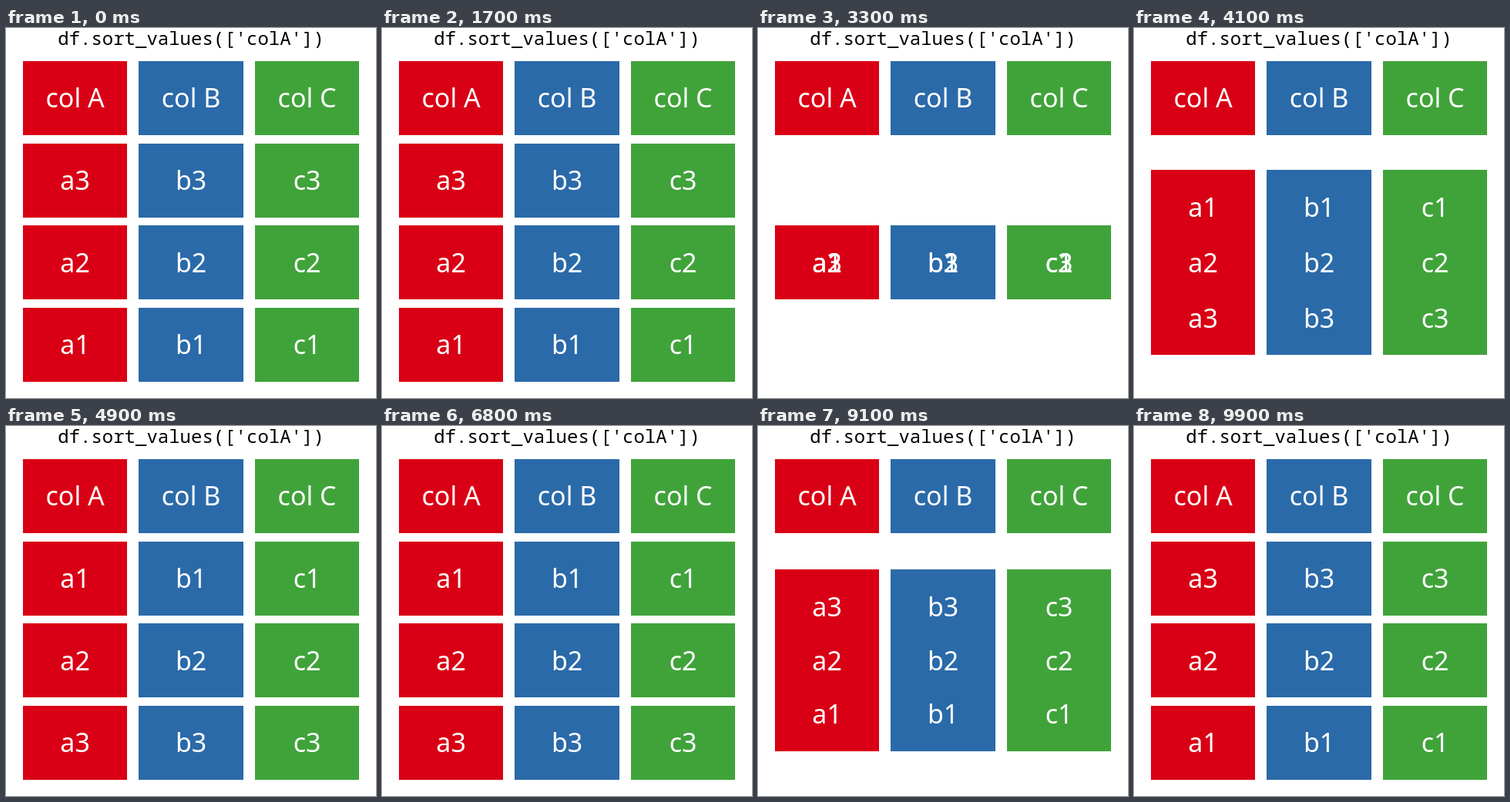
These frames come from a looping animation (480x480 px, 10000 ms). An HTML page with a canvas:

```html
<!DOCTYPE html>
<html lang="en">
<head>
<meta charset="utf-8">
<title>Sorting rows</title>
<style>
  html, body { margin: 0; height: 100%; overflow: hidden; background: #fff; }
  canvas { display: block; }
</style>
</head>
<body>
<canvas id="stage" width="480" height="480"></canvas>
<script>
const ctx = document.getElementById('stage').getContext('2d');
const LOOP = 10000, STEP = 100;
const MID = 256.35, PITCH = 106.8, HEIGHT = 96;
const columns = ['A', 'B', 'C'].map((name, i) => ({
  name,
  left: 21.8 + 150.5 * i,
  color: ['#d90015', '#2b6aa9', '#40a33a'][i]
}));

// Half a cosine wave from 1 to -1 between two times
function sweep(t, start, end) {
  const p = Math.min(1, Math.max(0, (t - start) / (end - start)));
  return Math.cos(Math.PI * p);
}

function box(col, top) {
  const x = Math.round(col.left), y = Math.round(top);
  ctx.fillStyle = col.color;
  ctx.fillRect(x, y, Math.round(col.left + 135.6) - x, Math.round(top + HEIGHT) - y);
}

function label(col, top, text) {
  ctx.fillStyle = '#fff';
  ctx.fillText(text, col.left + 67.8, top + 60.2);
}

function draw(now) {
  const t = Math.floor(now % LOOP / STEP) * STEP;
  const order = sweep(t, 1600, 5000) * sweep(t, 6700, 10000);
  const rowTop = n => MID + (2 - n) * PITCH * order;

  ctx.fillStyle = '#fff';
  ctx.fillRect(0, 0, 480, 480);
  ctx.textAlign = 'center';
  ctx.fillStyle = '#000';
  ctx.font = '24px "Noto Sans Mono", monospace';
  ctx.fillText("df.sort_values(['colA'])", 240, 22);

  ctx.font = '34px "Noto Sans", sans-serif';
  for (const col of columns) {
    const head = MID - 2 * PITCH;
    box(col, head);
    label(col, head, 'col ' + col.name);
    for (const n of [1, 2, 3]) box(col, rowTop(n));
    for (const n of [1, 2, 3]) label(col, rowTop(n), col.name.toLowerCase() + n);
  }
  requestAnimationFrame(draw);
}
draw(0);
</script>
</body>
</html>
```
